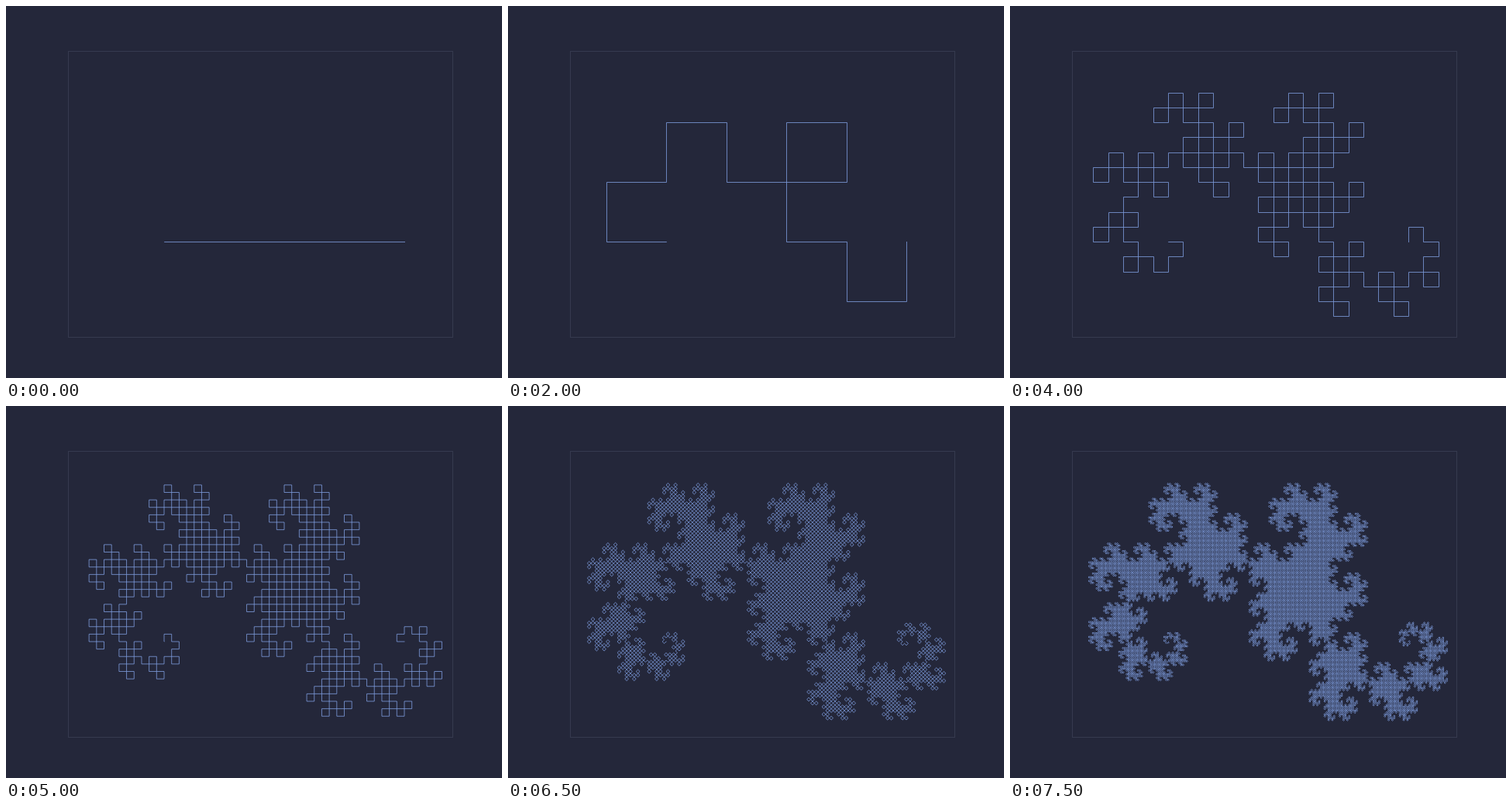
An HTML page with a canvas for the animation above (8 s loop, 640x480 px).

```html
<!DOCTYPE html>
<html lang="en">
<head>
<meta charset="utf-8">
<title>Dragon curve</title>
<style>
  html, body { margin: 0; width: 100%; height: 100%; overflow: hidden; background: #24273a; }
  canvas { display: block; }
</style>
</head>
<body>
<canvas id="stage" width="640" height="480"></canvas>
<script>
const STEP = 500, ORDERS = 16;
const ctx = document.getElementById('stage').getContext('2d', { willReadFrequently: true });

// Plot units to pixels
const toX = x => 204 + 310 * x;
const toY = y => 304 - 308 * y;
const snap = v => Math.floor(v + 0.5) + 0.5;

// Replace every segment by two, bending left and right in turn
function fold(points) {
  const out = [points[0]];
  for (let i = 1; i < points.length; i++) {
    const [ax, ay] = points[i - 1], [bx, by] = points[i];
    const side = i % 2 ? 1 : -1;
    const dx = bx - ax, dy = by - ay;
    out.push([(ax + bx - side * dy) / 2, (ay + by + side * dx) / 2], points[i]);
  }
  return out;
}

const curves = [[[0, 0], [1, 0]]];
while (curves.length < ORDERS) curves.push(fold(curves[curves.length - 1]));

function draw(order) {
  ctx.fillStyle = '#24273a';
  ctx.fillRect(0, 0, 640, 480);

  // Upright curves with few points sit on whole pixels
  const crisp = order % 2 === 0 && order < 10;
  const fit = crisp ? snap : v => v;
  ctx.beginPath();
  for (const [x, y] of curves[order]) ctx.lineTo(fit(toX(x)), fit(toY(y)));
  ctx.strokeStyle = '#8aadf4';
  ctx.lineWidth = 0.7;
  ctx.lineCap = 'square';
  ctx.lineJoin = 'miter';
  ctx.stroke();

  ctx.strokeStyle = '#363a4f';
  ctx.lineWidth = 1;
  ctx.strokeRect(80.5, 58.5, 496, 369);
}

const start = performance.now();
let shown = -1;
function tick() {
  const order = Math.floor((performance.now() - start) / STEP) % ORDERS;
  if (order !== shown) draw(shown = order);
  requestAnimationFrame(tick);
}
tick();
</script>
</body>
</html>
```
